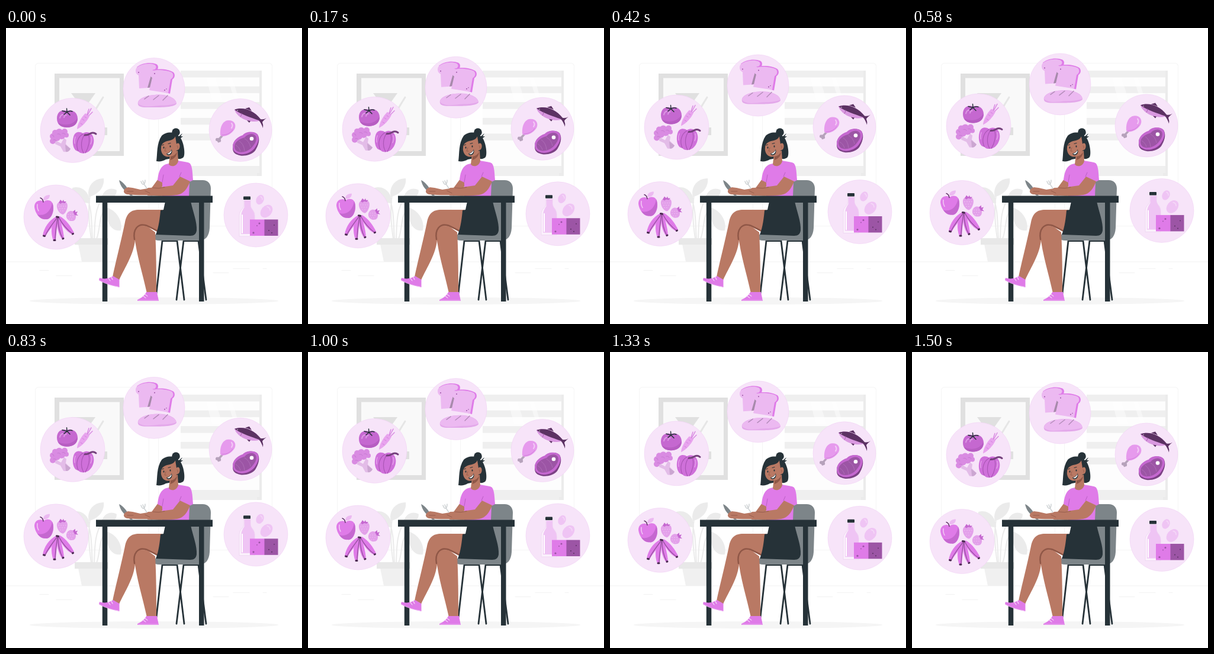
Write an HTML page that moves like this. It is 500 px wide and 500 px high and loops after 1.54 s.

```html
<!DOCTYPE html>
<html lang="en">
<head>
<meta charset="utf-8">
<title>Balanced diet</title>
<style>
html, body { margin: 0; height: 100%; overflow: hidden; background: #fff; }
svg { display: block; width: 100vw; height: 100vh; }
.line { fill: none; stroke-linecap: round; stroke-linejoin: round; }
.disc { fill: #f7e4f9; stroke: #efcdf3; stroke-width: .5; }
.ink { fill: #263238; }
.skin { fill: #b97964; }
.pink { fill: #df7be8; }
.pale { fill: #ecb9f1; }
.mid { fill: #c568d0; }
.deep { fill: #9c55a5; }
.dark { fill: #5c3263; }
</style>
</head>
<body>
<svg viewBox="0 0 500 500">
  <g id="room">
    <g class="line" stroke="#f5f5f5">
      <rect x="49.500" y="59.500" width="192" height="275" rx="5"/>
      <rect x="257.500" y="59.500" width="192" height="275" rx="5"/>
      <path stroke="#ededed" stroke-width=".7" d="M0 395H500M57 409.500h15M85 418.500h26M384 406.500h27M434 406.500h6M350 413.500h26"/>
    </g>
    <path fill="#e0e0e0" d="M82 77H199V216H82Z"/>
    <path fill="#f9f9f9" d="M90 84.500H192V208H90Z"/>
    <path fill="#e0e0e0" d="M110 110H151L134 134V165H128V134ZM162 168h9v13h-9Z"/>
    <path class="line" stroke="#e6e6e6" stroke-width="3" d="M164 117L145 148"/>
    <path fill="#fdfdfd" d="M295 72H432V250H295Z"/>
    <g id="slats" fill="#efefef"></g>
    <path fill="#fff" opacity=".4" d="M338 84H354L366 122H348ZM374 84H382L394 122H386Z"/>
    <path fill="#ebebeb" d="M428 72h4V250h-8v-5h4Z"/>
    <ellipse cx="250" cy="461" rx="210" ry="6" fill="#f5f5f5"/>
    <g fill="#ebebeb">
      <path d="M140 285C136 269 147 254 165 254C167 268 156 282 140 285ZM142 296C124 296 110 283 112 270C129 265 142 279 142 296ZM160 290C164 273 176 268 187 274C187 287 175 292 160 290ZM171 304C185 307 198 325 194 342C177 345 167 325 171 304Z"/>
      <g class="line" stroke="#ebebeb" stroke-width="2"><path d="M142 282C138 310 141 335 144 356M136 285C146 305 144 330 146 356M163 288C149 305 150 335 149 356M173 305C156 307 160 340 153 356"/></g>
      <path fill="#f0f0f0" d="M122 365H168L163 395H128Z"/>
      <path fill="#e8e8e8" d="M116 355H173V366H116Z"/>
    </g>
  </g>

  <g id="diner">
    <g class="line" stroke="#263238" stroke-width="2.800">
      <path d="M254 448L264 359.500H289L301 459M288 459L300 359.500H325L338 459"/>
    </g>
    <path fill="#7d8589" d="M309 257H332C341 257 346 263 346 271L344 338C343 351 338 359 326 359H258C251 359 248 355 248 349H309Z"/>
    <path class="ink" d="M162.800 294H171.300V462H162.800ZM326 294H334.500V462H326Z"/>
    <path class="skin" d="M217 351C216 337 227 331 240 336L252 345C254 380 254 420 254 449L238 448C231 415 220 382 217 351Z"/>
    <path class="skin" d="M264 307H225C211 307 204 313 201 328C194 362 184 400 180 421L191 426C201 404 216 382 218 358C217 340 225 331 239 336L258 345Z"/>
    <path class="line" stroke="#8f5747" stroke-width="2.500" d="M217 357C214 340 223 330 235 333C243 335 249 340 256 343"/>
    <path class="ink" d="M269 293H312C316 311 323 328 322 342C321 348 318 351 311 351L253 349C258 337 260 320 261 308L266 307Z"/>
    <path class="pink" d="M158 422C167 425 174 423 181 419L191.500 425V438C180 436 166 431 157 426ZM222 459C229 456 235 451 237 446L255 446L258 461H222Z"/>
    <path class="line" stroke="#fff" d="M173 423l3 4M178 421l2 4M232 453l4 3M235 450l4 3"/>
    <path class="line" stroke="#f2c6f6" stroke-width=".7" d="M158 427Q174 435 190 437M223 460H257"/>

    <path fill="#7d8589" d="M191 257C198 260 203 267 208 275L214 283H210L204 277C197 272 193 266 191 257Z"/>
    <path class="skin" d="M257 255L268 260L261 273C256 284 232 283 204 281C197 279 197 272 206 269L214 270L227 273L246 270Z"/>
    <path class="pink" d="M291 224C300 226 308 226 311 229C315 234 315 246 316 257L310 260L309 284H264V261L256 257C258 240 262 231 275 229C280 234 288 232 291 224Z"/>
    <path class="line" stroke="#b257bc" stroke-width=".8" d="M264 260L266 248M293 251L296 244"/>
    <path class="line" stroke="#cfd3d5" stroke-width="1.600" d="M228 259C231 268 235 264 235 257M231 258L234 265L246 283"/>
    <path class="skin" d="M294 251L311 259C306 272 300 280 289 282C275 284 255 284 240 283C232 281 233 274 240 270L261 269L282 266Z"/>
    <path class="line" stroke="#8f5747" stroke-width=".8" d="M205 276h10M235 275l8 4M248 270q10 2 20-1"/>

    <circle class="ink" cx="287" cy="176" r="6.800"/>
    <path class="ink" d="M263 182C270 175 285 174 292 183L298 178L295 183L299 183L295 186C301 195 303 214 300 218C296 222 291 222 286 219L270 222C265 225 260 226 254 225C256 212 254 195 263 182Z"/>
    <path class="skin" d="M277 213L290 207L291 225C288 235 278 235 275 230Z"/>
    <path fill="#8f5747" d="M278 217C284 216 287 213 289 209C289 216 284 221 278 223Z"/>
    <path class="skin" d="M262 202C262 196 266 193 272 191C279 190 284 188 286 183L288 196C292 191 296 199 292 205L288 207C286 215 277 219 270 217C264 215 261 208 262 202Z"/>
    <g class="line" stroke="#263238">
      <path d="M263.500 198l3-1M274 195.500l4-1"/>
      <path stroke="#8f5747" stroke-width=".8" d="M270 202l-2 6 3 0M289 199q2 0 1 4"/>
    </g>
    <ellipse class="ink" cx="266.500" cy="202" rx="1" ry="1.700"/>
    <ellipse class="ink" cx="277.500" cy="200" rx="1" ry="1.700"/>
    <path class="ink" d="M271 212Q277 211 280 205Q282 213 275 215Q272 215 271 212Z"/>
    <path fill="#fff" d="M272 212.500Q277 211 279.500 206.500Q280 211 275 213.500Z"/>
    <path class="ink" d="M152 283.500H349V295H152Z"/>
  </g>

  <g id="float">
    <g id="vegetables">
      <circle class="disc" cx="112.500" cy="173" r="54.500"/>
      <path class="mid" d="M86 153C86 142 94 137 103 140C113 137 121 143 121 153C121 163 113 168 103 168C93 168 86 163 86 153Z"/>
      <path fill="#b75dc2" d="M121 152C121 163 113 168 103 168C96 168 90 165 88 160C102 167 115 162 121 152Z"/>
      <path class="line" stroke="#dc97e4" stroke-width="2" d="M91 152q1-5 5-6M98 151q1-4 4-4"/>
      <path class="line" stroke="#263238" stroke-width="1.500" d="M102.500 136L103 142L95 140M98 146L103 142L108 147M103 142Q108 139 112 141"/>
      <path fill="#e8a4ee" d="M134 144L141 149C137 158 128 167 120 171C120 164 126 152 134 144Z"/>
      <path class="line" stroke="#d98be2" stroke-width="1.500" d="M137 146L140 137M138 147L144 136M140 148L146 142"/>
      <path class="line" stroke="#c568d0" stroke-width=".6" d="M129 154l3 2M126 161l3 2M133 150l3 2"/>
      <path fill="#e3bce8" d="M84 190L93 195L98 186L102 189L101 196L109 204C106 209 101 210 97 209L92 200L83 196Z"/>
      <path fill="#cba6d1" d="M100 197L109 204C107 208 104 210 101 209Z"/>
      <g fill="#d98be2">
        <circle cx="79" cy="183" r="5"/><circle cx="83" cy="177" r="5"/><circle cx="90" cy="176" r="6"/><circle cx="99" cy="175" r="5"/><circle cx="102" cy="181" r="4"/><circle cx="94" cy="182" r="6"/><circle cx="86" cy="185" r="6"/><circle cx="79" cy="191" r="5"/>
      </g>
      <path class="line" stroke="#c275cc" stroke-width=".8" d="M78 181q3 0 3 3M87 179q4-1 5 2M95 178q4-1 5 2M80 189q4-1 5 2"/>
      <path fill="#cf70da" d="M114 184C116 175 124 174 130 178C138 173 147 178 148 187C150 197 143 210 134 211C128 213 123 210 122 208C114 208 111 194 114 184Z"/>
      <path class="line" stroke="#ab56b6" stroke-width="1.200" d="M130 179C121 184 117 196 122 208M134 179C127 187 125 200 131 211M139 179C143 190 139 203 134 211"/>
      <path class="line" stroke="#e6a0ec" stroke-width="1.500" d="M117 184q-2 5-1 11M144 184q2 6-1 12"/>
      <path class="line" stroke="#75407c" stroke-width="3" d="M133 181Q138 181 141 179Q147 175 152 179"/>
    </g>

    <g id="bread">
      <circle class="disc" cx="250" cy="102.500" r="52"/>
      <path class="pink" d="M221 66C229 59 245 57 254 61C259 64 257 71 253 73L247 100L240 101Z"/>
      <path class="pale" d="M220 68C226 61 242 58 251 62C257 66 251 71 248 73L240 101L225 102L224 80C219 78 218 72 220 68Z"/>
      <path fill="#a78aab" d="M247 73L251 75L245 100L239 101Z"/>
      <path class="pink" d="M247 71C260 68 276 70 283 75C287 80 284 85 281 87L277 111L270 109L274 82Z"/>
      <path class="pale" d="M244 74C250 69 272 71 280 75C285 80 281 85 278 87L274 110L242 105L247 84C243 82 242 77 244 74Z"/>
      <g class="deep"><circle cx="224" cy="75" r="1"/><circle cx="251" cy="77" r="1"/><circle cx="268" cy="105" r="1"/><circle cx="271" cy="103" r=".8"/></g>
      <path fill="#e3a8ea" d="M223 129C221 120 235 114 251 113C268 111 288 117 288 128C284 134 263 134 250 134C237 134 224 135 223 129Z"/>
      <path class="pale" d="M223 127C224 119 237 114 251 113C268 112 286 117 288 127C276 132 260 130 249 132C238 133 228 133 223 127Z"/>
      <path class="line" stroke="#b48dba" stroke-width="1.500" d="M234 120l7-5M249 121l9-7M265 122l8-8"/>
    </g>

    <g id="protein">
      <circle class="disc" cx="396" cy="172.500" r="53"/>
      <path fill="#d998e0" d="M386 138C399 133 418 138 430 154L428 157C413 161 391 153 386 138Z"/>
      <path class="dark" d="M386 138C399 133 418 138 430 154Q436 155 440 152Q434 157 433 159Q435 164 434 169Q431 160 427 156C413 151 399 147 386 138Z"/>
      <path class="dark" d="M404 136L411 134L415 140ZM407 156L411 160L413 157Z"/>
      <path class="line" stroke="#9c55a5" stroke-width=".8" d="M398 144q0 4-2 6"/>
      <circle cx="391" cy="139.500" r=".7" fill="#fff"/>
      <path class="line" stroke="#b6a2bb" stroke-width="3.500" d="M367 180L358 190"/>
      <path fill="#b6a2bb" d="M354 189q0-4 4-3q4-1 5 3q1 4-3 4q-2 2-3-2q-3 0-3-2Z"/>
      <path fill="#e69aed" d="M362 181C361 169 365 157 375 156C385 155 390 163 386 171C381 179 373 183 365 183Z"/>
      <path class="line" stroke="#f3ccf6" stroke-width="2" d="M381 161q3 4 0 8"/>
      <path class="line" stroke="#cf78d9" stroke-width=".8" d="M365 181q12 0 18-9"/>
      <path fill="#7d4186" d="M383 203C382 193 390 184 400 182C405 175 420 174 425 180C430 188 426 199 421 207C415 215 399 218 391 214C385 212 383 208 383 203Z"/>
      <path class="mid" d="M383 200C383 191 391 184 400 181C406 174 420 174 425 180C429 187 425 196 420 203C413 212 398 216 390 211C385 209 383 205 383 200Z"/>
      <path class="deep" d="M386 200C386 193 394 187 403 185C409 178 418 177 422 183C425 189 420 196 416 201C409 209 397 212 390 208C387 206 386 203 386 200Z"/>
      <path class="line" stroke="#b577be" stroke-width=".7" d="M394 191q8 5 9 17M403 187q8 4 10 14M388 198q6 3 8 10"/>
      <circle cx="415" cy="187" r="3.300" fill="#fff"/>
    </g>

    <g id="dairy">
      <circle class="disc" cx="422" cy="316" r="54"/>
      <path fill="#fbf1fc" stroke="#edd3f0" stroke-width=".8" d="M402 290H413V299C413 306 420 307 420 317V352H394V317C394 307 402 306 402 299Z"/>
      <path fill="#efc4f4" d="M402.500 291H413V299C413 306 420 308 420 317V348H397V318Q397 311 402.500 303Z"/>
      <path class="line" stroke="#fff" stroke-width="2" d="M399 316V346"/>
      <rect class="ink" x="401" y="284.500" width="12" height="5.500" rx="1"/>
      <g fill="#efc4f4">
        <ellipse cx="429" cy="290" rx="6.300" ry="8.500" transform="rotate(25 429 290)"/>
        <ellipse cx="440" cy="309.500" rx="9" ry="12" transform="rotate(40 440 309.500)"/>
      </g>
      <path class="line" stroke="#f5d9f8" stroke-width="1.500" d="M441 302q5 1 5 6M430 285q3 1 3 5"/>
      <path class="pink" d="M412 323.500H437V351H412Z"/>
      <path class="deep" d="M436.500 323.500H459.500V351H436.500Z"/>
      <g class="deep"><circle cx="428" cy="330" r="1.500"/><circle cx="418" cy="346" r="1.600"/><circle cx="424" cy="334" r=".9"/></g>
      <g class="dark"><circle cx="444" cy="342" r="1"/><circle cx="453" cy="333" r=".9"/><circle cx="449" cy="346" r="1"/></g>
    </g>

    <g id="fruit">
      <circle class="disc" cx="84.500" cy="319.500" r="54.500"/>
      <path class="pink" d="M48 302C48 293 56 289 64 293C73 288 80 293 80 303C81 314 74 325 67 323C59 325 49 314 48 302Z"/>
      <path class="mid" d="M78 295C83 306 77 325 67 323C61 323 56 320 53 315C66 319 76 309 78 295Z"/>
      <path class="line" stroke="#5c3263" stroke-width="1.500" d="M63 294Q62 288 58 287"/>
      <path class="pale" d="M63 291C63 284 68 282 74 282C74 288 70 291 63 291Z"/>
      <path class="line" stroke="#f3ccf6" stroke-width="1.500" d="M53 298q-1 6 2 11"/>
      <path fill="#e3a0ea" d="M86 299C87 293 95 291 102 295C107 300 101 314 96 315C90 314 85 305 86 299Z"/>
      <path class="mid" d="M89 295L92 290L95 293L97 290L98 293L102 293L99 296L95 295L92 297Z"/>
      <path fill="#e3a0ea" d="M102 316C104 308 112 307 116 312C120 318 118 326 112 326C106 327 101 322 102 316Z"/>
      <path class="mid" d="M113 310L117 307L117 311L121 310L119 314L122 317L116 316Z"/>
      <g class="line" stroke="#f5d5f8" stroke-width="1.200" stroke-dasharray="0 4"><path d="M89 301h13M91 305h10M92 309h7M105 315h9M105 319h12M107 323h8"/></g>
      <g class="pink">
        <path d="M84 319C73 325 64 337 62 351L67 352C71 343 79 336 87 322Z"/>
        <path d="M84 320C76 330 75 346 80 359L84 359C85 346 86 333 88 321Z"/>
        <path d="M86 320C85 334 88 348 95 357L98 355C97 343 94 331 90 320Z"/>
        <path d="M88 320C93 332 101 343 112 349L115 346C110 336 102 324 91 318Z"/>
      </g>
      <path class="line" stroke="#9c55a5" stroke-width="1.500" d="M86 321C78 332 71 340 66 351M87 321C85 335 83 347 83 358M88 321C88 335 91 347 96 356M89 320C95 331 103 341 113 348"/>
      <path class="line" stroke="#4a2950" stroke-width="3" d="M63.500 351l2 .5M81 358.500h2M96 356l1-.5M112.500 348l1-.5M85.500 319l3 .5"/>
    </g>
  </g>
</svg>
<script>
const LOOP = 1540, LEAD = 40, RISE = 10, REST = 0.5;
const slats = document.getElementById('slats');
const floating = document.getElementById('float');

for (let y = 72; y < 190; y += 26.6) {
  slats.innerHTML += `<rect x="295" y="${y}" width="133" height="11.500"/>`;
}
slats.innerHTML += '<rect x="295" y="233" width="133" height="17"/>';

// Linear rise and fall.
function draw() {
  const phase = ((performance.now() + LEAD) % LOOP) / LOOP;
  const lift = RISE * (1 - Math.abs(1 - 2 * phase));
  floating.setAttribute('transform', `translate(0 ${REST - lift})`);
  requestAnimationFrame(draw);
}
draw();
</script>
</body>
</html>
```
